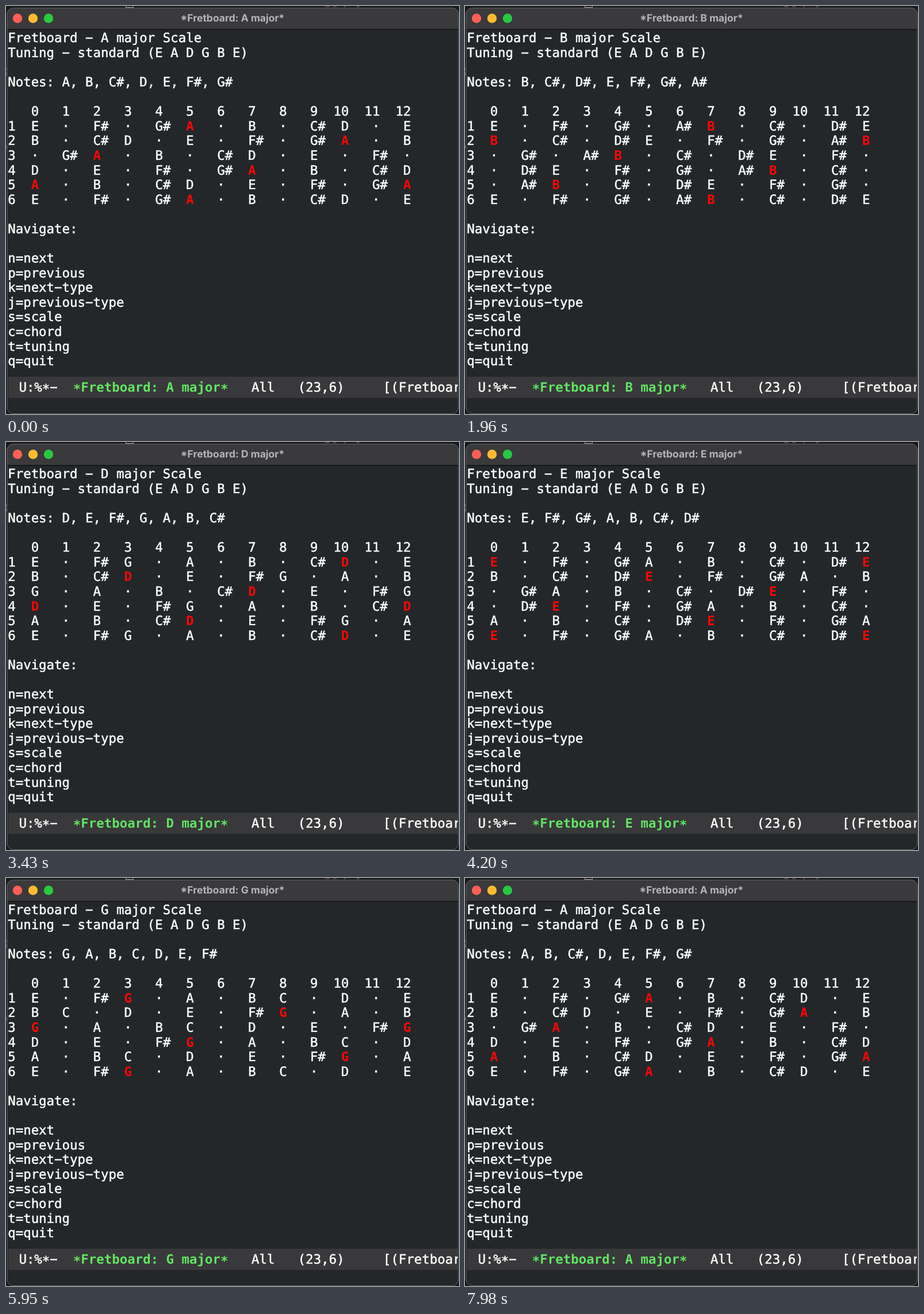
Animation of 788 by 711 pixels, one loop 8 s. Source, as an HTML page:

```html
<!DOCTYPE html>
<html lang="en">
<head>
<meta charset="utf-8">
<title>Fretboard</title>
<style>
  html, body { margin: 0; width: 100%; height: 100%; overflow: hidden; background: #18191b; }
  svg { display: block; width: 100%; height: 100%; }
  text { white-space: pre; text-rendering: geometricPrecision; }
  .mono { font: 22.4px "DejaVu Sans Mono", monospace; fill: #fcfcfc; stroke: #fcfcfc; stroke-width: 0.5px; }
  .bold { font-weight: 700; stroke: none; }
  .root { fill: #ff0606; }
  .name { fill: #62e463; }
  #title { font: 700 17.5px Inter, sans-serif; fill: #b5b4b6; text-anchor: middle; }
</style>
</head>
<body>
<svg viewBox="0 0 788 711">
  <defs>
    <clipPath id="win"><rect x="1.5" y="3" width="785.5" height="707.5" rx="11"/></clipPath>
    <clipPath id="bar"><rect x="4" y="646" width="782" height="37"/></clipPath>
  </defs>
  <rect width="788" height="711" fill="#18191b"/>
  <path d="M208.500 0V2.500H221.500V0" fill="none" stroke="#aaa"/>
  <path d="M555 1h8M569 1h6M588 1h3M610 1h5M0.500 108v4M0.500 116v5M0.500 243v5" stroke="#777"/>
  <g clip-path="url(#win)">
    <rect width="788" height="711" fill="#232729"/>
    <rect width="788" height="40" fill="#3a393b"/>
    <rect y="40" width="788" height="1.500" fill="#101112"/>
    <rect x="4" y="646" width="782" height="37" fill="#39393b"/>
  </g>
  <rect x="2" y="3.500" width="785" height="707" rx="11" fill="none" stroke="#656668"/>
  <circle cx="20" cy="21.500" r="8.200" fill="#ff5f57"/>
  <circle cx="47" cy="21.500" r="8.200" fill="#febc2e"/>
  <circle cx="74" cy="21.500" r="8.200" fill="#28c840"/>
  <text id="title" x="394" y="27.300"></text>
  <g id="fixed"></g>
  <g id="board"></g>
  <g id="mode" clip-path="url(#bar)"></g>
</svg>
<script>
const $ = id => document.getElementById(id);
const CHAR = 13.485, LINE = 25.58, LEFT = 3.2, TOP = 63.4, LOOP = 8000;
const NOTES = ['A', 'A#', 'B', 'C', 'C#', 'D', 'D#', 'E', 'F', 'F#', 'G', 'G#'];
const MAJOR = [0, 2, 4, 5, 7, 9, 11];
const STRINGS = [7, 2, 10, 5, 0, 7];
const PRESSES = [1400, 1890, 2380, 2870, 3290, 3710, 4200, 4620, 5110, 5600, 6090, 6720];

function write(parent, x, y, str, cls = '') {
  const el = document.createElementNS('http://www.w3.org/2000/svg', 'text');
  // Asterisks sit at mid height, dashes are wide
  const drop = [...str].map(c => c === '*' ? 3 : 0);
  el.setAttribute('x', x);
  el.setAttribute('y', y);
  if (str.includes('*')) el.setAttribute('dy', drop.map((d, i) => d - (drop[i - 1] || 0)).join(' '));
  el.setAttribute('class', 'mono ' + cls);
  el.textContent = str.replace(/-/g, '\u2212');
  parent.append(el);
}

const put = (parent, row, col, str, cls) =>
  write(parent, LEFT + col * CHAR, TOP + row * LINE, str, cls);

function drawFixed() {
  const g = $('fixed');
  put(g, 1, 0, 'Tuning - standard (E A D G B E)');
  for (let fret = 0; fret <= 12; fret++) put(g, 5, fret < 10 ? 3 + fret * 4 : 2 + fret * 4, String(fret));
  STRINGS.forEach((_, i) => put(g, 6 + i, 0, String(i + 1)));
  put(g, 13, 0, 'Navigate:');
  ['n=next', 'p=previous', 'k=next-type', 'j=previous-type', 's=scale', 'c=chord', 't=tuning', 'q=quit']
    .forEach((key, i) => put(g, 15 + i, 0, key));
}

function drawScale(root) {
  const board = $('board'), mode = $('mode');
  const scale = MAJOR.map(step => (root + step) % 12);
  const name = `*Fretboard: ${NOTES[root]} major*`;
  board.replaceChildren();
  mode.replaceChildren();
  $('title').textContent = name;

  put(board, 0, 0, `Fretboard - ${NOTES[root]} major Scale`);
  put(board, 3, 0, 'Notes: ' + scale.map(n => NOTES[n]).join(', '));
  STRINGS.forEach((open, i) => {
    for (let fret = 0; fret <= 12; fret++) {
      const note = (open + fret) % 12;
      put(board, 6 + i, 3 + fret * 4, scale.includes(note) ? NOTES[note] : '·', note === root ? 'root bold' : '');
    }
  });

  const x = 22.4, y = 672;
  write(mode, x, y, 'U:%*-');
  write(mode, x + 7 * CHAR, y, name, 'name bold');
  write(mode, x + (10 + name.length) * CHAR, y, 'All   (23,6)     [(Fretboard)]');
}

let shown = -1;
const start = performance.now();

function render() {
  const t = (performance.now() - start) % LOOP;
  const root = PRESSES.filter(p => p <= t).length % 12;
  if (root !== shown) drawScale(shown = root);
  requestAnimationFrame(render);
}

drawFixed();
render();
</script>
</body>
</html>
```
